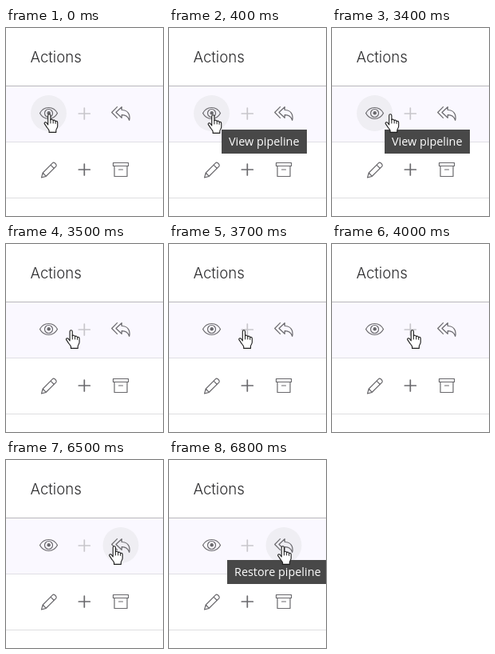
These frames come from a looping animation (197 px wide and 235 px high, 8000 ms). An HTML page with a canvas:

```html
<!DOCTYPE html>
<html lang="en">
<head>
<meta charset="utf-8">
<title>Row actions</title>
<style>
html, body { margin: 0; width: 100%; height: 100%; overflow: hidden; background: #fff; }
canvas { display: block; width: 197px; height: 235px; }
</style>
</head>
<body>
<canvas id="stage" width="197" height="235"></canvas>
<script>
const ctx = document.getElementById('stage').getContext('2d');
const LOOP = 8000;
const STEP = 100;
const INK = '#6a696d';

const hand = new Path2D(`M5.2 14 V2.4 C5.2 .1 8.4 .1 8.4 2.4 V7.8
  C9 6.7 11.5 7 11.7 8.7 C12.5 7.7 14.4 8.1 14.6 9.6
  C15.6 8.9 17.2 9.6 17.2 11.2 V15.8 C17.2 18.2 15.3 19.2 15.3 21
  V23.4 H6.6 V21.2 C5.6 18.8 3.7 17.5 2.7 15.4
  L.9 12.9 C-.1 11.2 2 10 3.4 11.5 Z`);
const knuckles = new Path2D('M8.4 7.8 V12 M11.7 8.6 V12 M14.6 9.6 V12.4');

const eye = new Path2D(`M42.5 106.5 C47.5 97.2 59.5 97.2 64.5 106.5
  C59.5 115.8 47.5 115.8 42.5 106.5 Z`);
const replyAll = new Path2D(`M139.5 98.7 L132.7 105.5 L139.5 112.3
  M145.2 98.7 L138 105.5 L145.2 112.3 V108.6
  C150 108.4 153 110.2 154.7 115.4 C156.3 107.5 152.5 102.6 145.2 102.5 Z`);
const pencil = new Path2D(`M44.5 187 L46.2 181 L58.3 168.8
  C60.2 166.9 64.8 171 62.6 173.2 L50.3 185.3 Z
  M46.2 181 L50.3 185.3 M56 171.2 L60.3 175.5`);
const archive = new Path2D(`M134.5 168.5 H153.5 V172.5 H134.5 Z
  M136 172.5 V185.5 H152 V172.5 M141.5 177 H146.5`);

// Progress from 0 to 1 between two times
const span = (t, from, to) => Math.min(1, Math.max(0, (t - from) / (to - from)));

function stroke(path, color = INK, width = 1.2) {
  ctx.strokeStyle = color;
  ctx.lineWidth = width;
  ctx.stroke(path);
}

function rect(color, x, y, w, h) {
  ctx.fillStyle = color;
  ctx.fillRect(x, y, w, h);
}

function disc(color, x, y, r) {
  ctx.fillStyle = color;
  ctx.beginPath();
  ctx.arc(x, y, r, 0, Math.PI * 2);
  ctx.fill();
}

function text(str, x, y, font, color) {
  ctx.font = font;
  ctx.fillStyle = color;
  ctx.fillText(str, x, y);
}

function plus(y, color) {
  stroke(new Path2D(`M91.3 ${y} h14 M98.3 ${y - 7} v14`), color, 1.7);
}

function drawEye() {
  stroke(eye);
  ctx.beginPath();
  ctx.arc(53.5, 106.5, 5, 0, Math.PI * 2);
  ctx.stroke();
  disc(INK, 53.7, 106.3, 2.2);
}

function halo(x, alpha) {
  ctx.globalAlpha = alpha;
  disc('#efeef3', x, 106.5, 22.5);
  ctx.globalAlpha = 1;
}

function tooltip(str, x, y, w) {
  rect('#484848', x, y, w, 30);
  text(str, x + 9, y + 20, '14.4px "Open Sans", "Noto Sans", sans-serif', '#fff');
}

// A nudge, an eased glide to the plus, then a steady move to the reply icon
function pointer(t) {
  const nudge = span(t, 3000, 3200) ** 3;
  const glide = 1 - (1 - span(t, 3300, 4000)) ** 2;
  const move = span(t, 6000, 6600);
  const settle = span(t, 0, 100) - span(t, 3300, 3400);
  ctx.save();
  ctx.translate(47.5 + settle + 9 * nudge + 37.5 * glide + 42 * move, 107 + settle);
  ctx.fillStyle = '#fff';
  ctx.fill(hand);
  stroke(hand, '#1c1c1c', 1.1);
  stroke(knuckles, '#1c1c1c', 1);
  ctx.restore();
}

function draw(t) {
  const onEye = t < 3500;
  rect('#fff', 0, 0, 197, 235);
  rect('#faf8ff', 0, 73, 197, 69);
  rect('#b9b8bc', 0, 72, 197, 1);
  rect('#e0dfe4', 0, 142, 197, 1);
  rect('#dedee0', 0, 212, 197, 1);
  text('Actions', 30.5, 43, '300 18.6px Inter, sans-serif', '#2c2c2e');

  halo(53.5, onEye ? 1 : 0);
  halo(144, span(t, 6300, 6500));

  ctx.lineJoin = ctx.lineCap = 'round';
  drawEye();
  plus(107, '#c8c6cb');
  stroke(replyAll);
  stroke(pencil);
  plus(177, INK);
  stroke(archive);

  if (onEye && t >= 400) tooltip('View pipeline', 66, 127, 107);
  if (t >= 6800) tooltip('Restore pipeline', 73, 125, 125);
  pointer(t);
}

const start = performance.now();
function tick() {
  const t = (performance.now() - start) % LOOP;
  draw(Math.floor(t / STEP) * STEP);
  requestAnimationFrame(tick);
}
tick();
</script>
</body>
</html>
```
